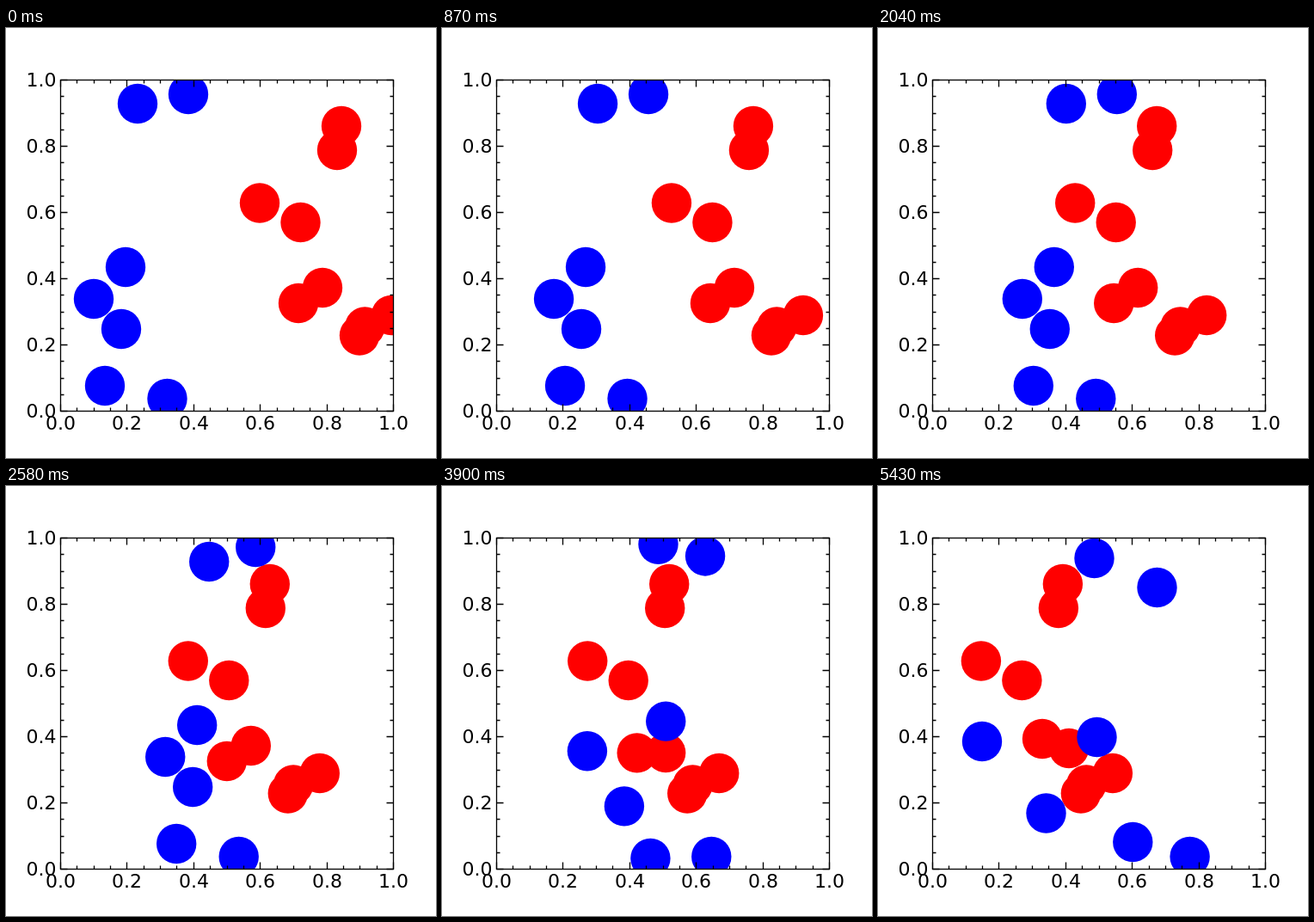
Animation of 500 by 500 pixels, one loop 5460 ms. Source, as an HTML page:

```html
<!DOCTYPE html>
<html lang="en">
<head>
<meta charset="utf-8">
<title>Two groups of discs</title>
<style>
  html, body { margin: 0; width: 100%; height: 100%; overflow: hidden; background: #fff; }
  svg { display: block; width: 500px; height: 500px; }
  text { font: 22px "DejaVu Sans", sans-serif; fill: #000; }
  .line { fill: none; stroke: #000; stroke-width: 1.3; }
</style>
</head>
<body>
<svg viewBox="0 0 500 500">
  <clipPath id="plot"><rect x="63.5" y="60.5" width="387" height="385"/></clipPath>
  <g id="discs" clip-path="url(#plot)"></g>
  <path id="ticks" class="line"/>
  <rect class="line" x="63.5" y="60.5" width="387" height="385"/>
  <g id="labels"></g>
</svg>
<script>
const LEFT = 63.5, TOP = 60.5, RIGHT = 450.5, BOTTOM = 445.5;
const STEP_MS = 30, STEPS = 182, LAST = STEPS - 1;
const SPEED = 0.9675; // pixels per step
const RADIUS = 23.2;

const byId = id => document.getElementById(id);

function add(parent, tag, attrs) {
  const node = document.createElementNS("http://www.w3.org/2000/svg", tag);
  for (const key in attrs) node.setAttribute(key, attrs[key]);
  parent.append(node);
  return node;
}

function drawAxes() {
  let d = "";
  for (let i = 0; i <= 20; i++) {
    const x = Math.round(LEFT + (RIGHT - LEFT) * i / 20 - 0.5) + 0.5;
    const y = Math.round(BOTTOM - (BOTTOM - TOP) * i / 20 - 0.5) + 0.5;
    const len = i % 4 ? 4 : 8;
    d += `M${x} ${BOTTOM}v${-len}M${x} ${TOP}v${len}M${LEFT} ${y}h${len}M${RIGHT} ${y}h${-len}`;
    if (i % 4) continue;
    const value = (i / 20).toFixed(1);
    add(byId("labels"), "text", { x, y: 467, "text-anchor": "middle" }).textContent = value;
    add(byId("labels"), "text", { x: 58.5, y: y + 7.5, "text-anchor": "end" }).textContent = value;
  }
  byId("ticks").setAttribute("d", d);
}

// A disc drifts sideways until its first bend [step, x, y], then runs straight between bends.
function disc(fill, x, y, bends = []) {
  const drift = fill === "#f00" ? -SPEED : SPEED;
  const path = [[0, x, y], ...bends];
  if (!bends.length) path.push([LAST, x + drift * LAST, y]);
  return { path, node: add(byId("discs"), "circle", { r: RADIUS, fill }) };
}
const red = (...args) => disc("#f00", ...args);
const blue = (...args) => disc("#00f", ...args);

const discs = [
  red(390, 114), red(385, 142), red(295, 203.5), red(342.5, 226),
  red(417.3, 347.5), red(411, 357.5), red(448, 334),
  red(340, 320, [[98, 245.2, 320], [109, 239, 317.5], [138, 222, 307.7], [LAST, 191, 294]]),
  red(368, 302, [[98, 273.2, 302], [109, 271, 308], [138, 256, 311], [LAST, 222, 305]]),
  blue(187.5, 431),
  blue(153, 88, [[102, 251.7, 88], [140, 251.4, 60.5], [152, 252, 69], [LAST, 251.5, 84]]),
  blue(212, 77, [[77.8, 287.3, 77], [100.8, 295.5, 60.5], [LAST, 324.5, 118]]),
  blue(139, 278, [[98, 233.8, 278], [109, 242.5, 272], [138, 267, 274.3], [LAST, 254.5, 292]]),
  blue(102, 315, [[99.1, 197.9, 315], [LAST, 121, 297]]),
  blue(134, 350, [[88.4, 219.5, 350], [109, 216.5, 370], [150, 207.5, 374.7], [LAST, 195.5, 380.5]]),
  blue(115, 416, [[110, 221.4, 416], [144.2, 257.3, 445], [LAST, 296.3, 414]])
];

function pointAt(path, step) {
  let i = 1;
  while (i < path.length - 1 && path[i][0] < step) i++;
  const [t0, x0, y0] = path[i - 1], [t1, x1, y1] = path[i];
  const k = (step - t0) / (t1 - t0);
  return [x0 + (x1 - x0) * k, y0 + (y1 - y0) * k];
}

const start = performance.now();
function draw(now) {
  const step = Math.floor(Math.max(0, now - start) / STEP_MS) % STEPS;
  for (const { path, node } of discs) {
    const [x, y] = pointAt(path, step);
    node.setAttribute("cx", x);
    node.setAttribute("cy", y);
  }
  requestAnimationFrame(draw);
}

drawAxes();
draw(start);
</script>
</body>
</html>
```
